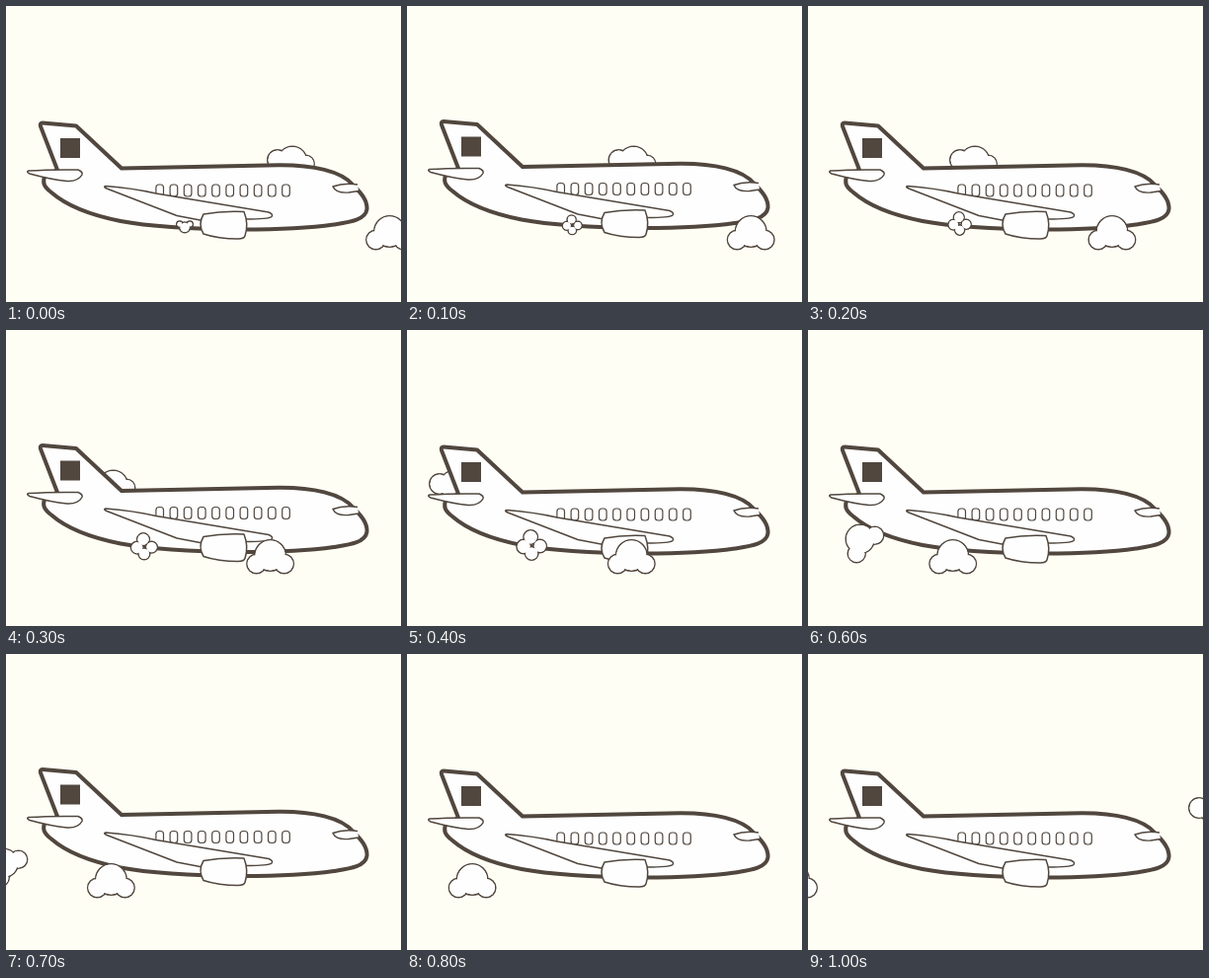
Animation, 400 px wide and 300 px high, one loop 1.1 s. Source, as an HTML page:

```html
<!DOCTYPE html>
<html lang="en">
<head>
<meta charset="utf-8">
<title>Airplane</title>
<style>
  html, body { margin: 0; width: 100%; height: 100%; overflow: hidden; background: #fffef5; }
  svg { display: block; width: 400px; height: 300px; }
  .thin { fill: #fefefe; stroke: #51473e; stroke-width: 1.5; stroke-linejoin: round; }
  .hull { fill: #fefefe; stroke: #51473e; stroke-width: 4; stroke-linejoin: round; }
  .body { fill: #fefefe; }
</style>
</head>
<body>
<svg viewBox="0 0 400 300">
  <g id="far"></g>
  <g id="plane">
    <path class="hull" d="M37 118.5 L71 121.5 L117 164.5 L276 161.3 C310 161 340 167 352 182
      C360 190 366 197 365.5 206 C364 217 348 219 332 221.5 C300 226 266 226.5 240 226.5
      C190 226 148 224 116 218 C86 212 62 203 46 189 C38 183 37 179 39 173 L52 166 L35 122 Q34 118.5 37 118.5Z"/>
    <rect x="55" y="134" width="20" height="20" fill="#51473e"/>
    <path class="thin" d="M23 167 Q45 165.5 73 166 Q78 168 77 171 Q73 178 62 177.5 Q46 176 24 170 Q20 168 23 167Z"/>
    <g id="windows"></g>
    <path class="thin" d="M356 181 Q342 179 331 183 Q334 190 347 189 L357 187.5"/>
    <path class="thin" d="M101 182.5 Q128 184.5 152 190 L266 209 Q271 211 269 213.5 Q266 216 243 216
      L199 217.5 L173 212.5 L102 185 Q98 183 101 182.5Z"/>
    <path class="thin" d="M200 211 Q219 207.5 241 208.5 Q246 221 242 233 Q241 236 235 236
      Q215 236 200 231 Q194 221 200 211Z"/>
  </g>
  <g id="puff"></g>
  <g id="near"></g>
</svg>
<script>
const STEP = 100, STEPS = 11;
const $ = id => document.getElementById(id);

// Lobes are [x, y, radius] around the middle of each shape.
const nearCloud = [[-14, 7.5, 10.5], [0, -1, 16.5], [14, 7.5, 10.5]];
const farCloud = [[-13.5, -1, 11], [1.5, 0, 15.5], [15, 3, 9.5]];
const clover = [[-8, 1.5, 8], [-1, -8, 8], [8.5, 1, 7.5], [0, 8.5, 7.5]];

function cloud(lobes, x, y, scale = 1, degrees = 0) {
  const c = Math.cos(degrees * Math.PI / 180) * scale;
  const s = Math.sin(degrees * Math.PI / 180) * scale;
  const circles = (cls, inset) => lobes.map(([lx, ly, r]) =>
    `<circle class="${cls}" cx="${x + lx * c - ly * s}" cy="${y + lx * s + ly * c}" r="${r * scale - inset}"/>`
  ).join('');
  return circles('thin', 0.75) + circles('body', 1.5);
}

function puff(step) {
  if (step === 0) return cloud(nearCloud, 181, 224, 0.37, 180);
  if (step < 6) {
    const scale = Math.min(1, 0.55 + step * 0.112);
    return cloud(clover, 181 - step * 13.7, Math.max(218, 223 - step * 1.25), scale);
  }
  return step < 8 ? cloud(nearCloud, 53.5 - (step - 6) * 55, 212.5, 0.93, -45) : '';
}

function draw(time) {
  const step = Math.floor(time / STEP) % STEPS;
  const farX = 288.5 - 60.5 * step + (step > 6 ? 726 : 0);
  $('far').innerHTML = cloud(farCloud, farX, 157);
  $('near').innerHTML = cloud(nearCloud, 388.5 - 40.3 * step, 229.5);
  $('puff').innerHTML = puff(step);
  $('plane').setAttribute('transform', `translate(0 ${step % 2 ? -1.5 : 0})`);
}

$('windows').innerHTML = Array.from({ length: 10 }, (_, i) =>
  `<rect class="thin" style="stroke-width:1.2" x="${151.9 + i * 14.2}" y="181" width="7.6" height="12" rx="3"/>`
).join('');

const start = performance.now();
function tick() {
  draw(performance.now() - start);
  requestAnimationFrame(tick);
}
tick();
</script>
</body>
</html>
```
